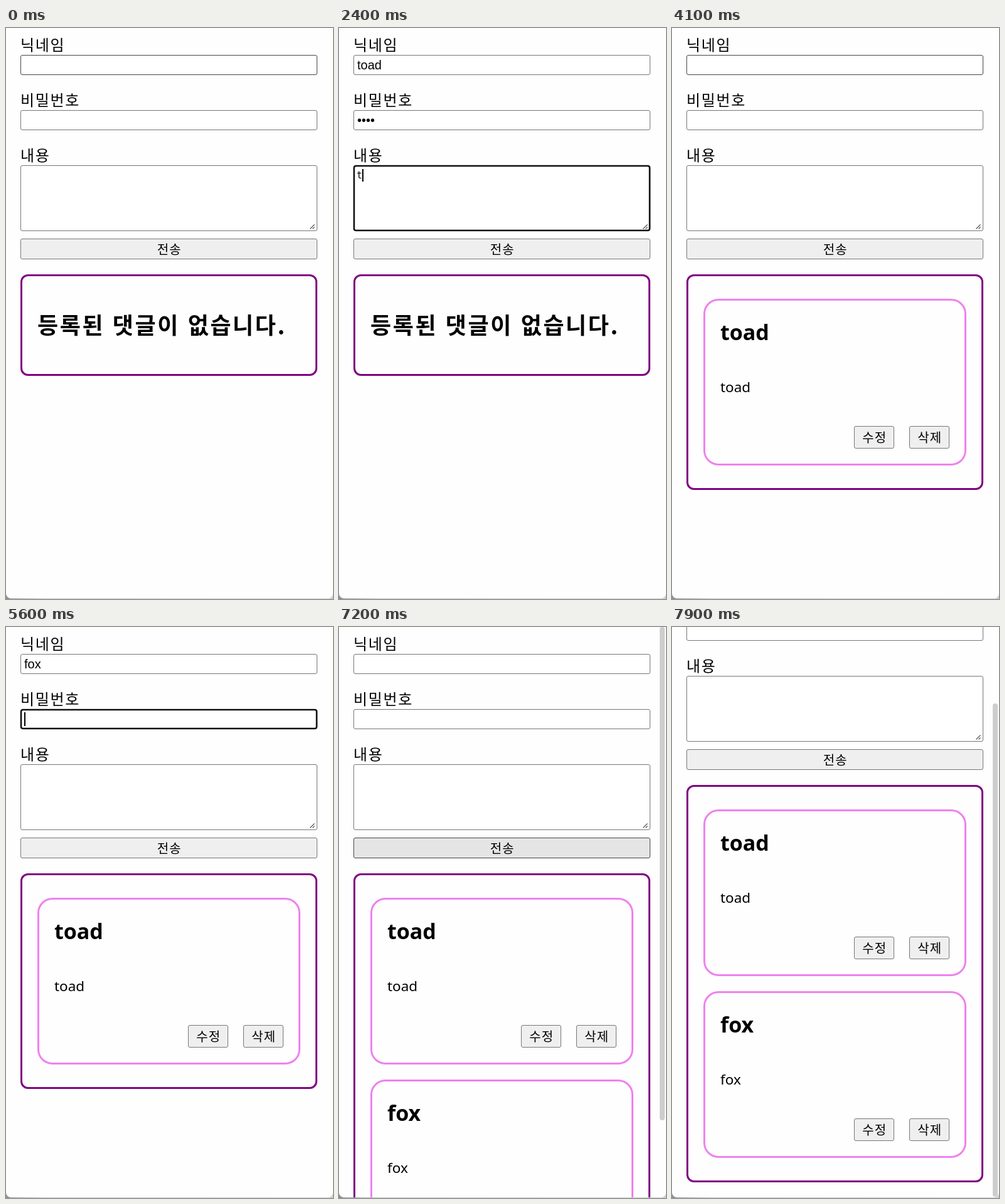
These frames come from a looping animation (521 px wide and 911 px high, 8000 ms). An HTML page:

```html
<!DOCTYPE html>
<html lang="ko">
<head>
<meta charset="utf-8">
<title>댓글</title>
<style>
  html, body { margin: 0; width: 100%; height: 100%; overflow: hidden; }
  svg { display: block; width: 521px; height: 911px; background: linear-gradient(90deg, #8d9196, #c3c7ca 12%, #cfd1d3); }
  text { font-family: "Noto Sans CJK KR", "Noto Sans CJK", sans-serif; white-space: pre; }
  .label { font-size: 24px; letter-spacing: 1.7px; }
  .empty { font-size: 36px; font-weight: 700; letter-spacing: 2.6px; }
  .btn text { font-size: 20px; letter-spacing: 1.2px; text-anchor: middle; }
  .btn rect { fill: #efefef; }
  .box { fill: #fff; stroke: #767676; }
  .hover .box { stroke: #454545; }
  .btn.hover rect { fill: #e5e5e5; }
  .ring { fill: none; stroke: #101010; stroke-width: 2.6; visibility: hidden; }
  .focus .ring { visibility: visible; }
  .caret { visibility: hidden; }
  .focus .caret { visibility: visible; }
  .value { font: 20px "Liberation Sans", Arial, sans-serif; }
  .mono { font: 15px "DejaVu Sans Mono", monospace; }
  .list { fill: none; stroke: #800080; stroke-width: 3; }
  .card { fill: none; stroke: #ee82ee; stroke-width: 3; }
  .name { font: 700 34px "Noto Sans", "Open Sans", sans-serif; }
  .body { font: 22.5px "Noto Sans", "Open Sans", sans-serif; }
  .grip { fill: none; stroke: #555; stroke-width: 1.2; }
</style>
</head>
<body>
<svg viewBox="0 0 521 911">
  <clipPath id="window"><path d="M0 0H521V902a8 8 0 0 1-8 8H8a8 8 0 0 1-8-8z"/></clipPath>
  <g clip-path="url(#window)">
    <rect width="521" height="911" fill="#fefefe"/>
    <g id="page"></g>
    <rect id="thumb" x="511" width="8" height="787" rx="4" fill="#cdcdcd"/>
  </g>
</svg>
<script>
const LOOP = 8000, TICK = 100, SCROLL = 141, THUMB_TRAVEL = 122;
const FIRST = 'toad', SECOND = 'fox';
const $ = id => document.getElementById(id);

const button = (id, x, y, w, h, label) => `
  <g class="btn" id="${id}">
    <rect class="box" x="${x + .5}" y="${y + .5}" width="${w - 1}" height="${h - 1}" rx="2.5"/>
    <text x="${x + w / 2 + .8}" y="${y + h / 2 + 8}">${label}</text>
  </g>`;

const field = (id, y, h, label, textX, baseline, caretY, caretH, font) => `
  <text class="label" x="23" y="${y - 7}">${label}</text>
  <g id="${id}">
    <rect class="box" x="23.5" y="${y + .5}" width="472" height="${h - 1}" rx="2.5"/>
    <rect class="ring" x="24" y="${y + 1}" width="471" height="${h - 2}" rx="3"/>
    <text class="${font}" x="${textX}" y="${baseline}"></text>
    <rect class="caret" x="${textX}" y="${caretY}" width="2" height="${caretH}"/>
  </g>`;

const post = (name, i) => `
  <g id="post${i}" transform="translate(0 ${i * 290})">
    <rect class="card" x="51.5" y="433.5" width="416" height="263" rx="22.5"/>
    <text class="name" x="77" y="498">${name}</text>
    <text class="body" x="77" y="581">${name}</text>
    ${button('edit' + i, 290, 635, 64, 36, '수정')}
    ${button('delete' + i, 378, 635, 64, 36, '삭제')}
  </g>`;

$('page').innerHTML =
  field('nick', 43, 32, '닉네임', 29, 66, 48, 22, 'value') +
  field('pass', 131, 32, '비밀번호', 29, 154, 136, 22, 'value') +
  field('memo', 219, 105, '내용', 28, 240, 225, 20, 'mono') +
  '<path class="grip" d="M484.5 320.5l7-7M488.5 320.5l3-3"/>' +
  button('send', 23, 336, 473, 33, '전송') +
  '<rect class="list" id="list" x="24.5" y="394.5" width="470" rx="10.5"/>' +
  '<text class="empty" id="empty" x="50" y="488">등록된 댓글이 없습니다.</text>' +
  post(FIRST, 0) + post(SECOND, 1);

const START = { nick: '', pass: '', memo: '', hover: 'nick', focus: '', posts: 0 };
const type = (id, word, ...times) =>
  times.map((t, i) => [t, { [id]: word.slice(0, i + 1) }]);
const sent = posts => ({ ...START, hover: 'send', posts });

const events = [
  [300, { focus: 'nick' }],
  ...type('nick', FIRST, 400, 600, 800, 900),
  [1100, { hover: 'pass' }],
  [1400, { focus: 'pass' }],
  ...type('pass', '••••', 1500, 1700, 1800, 1900),
  [2100, { hover: 'memo' }],
  [2300, { focus: 'memo' }],
  ...type('memo', FIRST, 2400, 2700, 2900, 2900),
  [3000, { hover: 'send' }],
  [3300, sent(1)],
  [3400, { hover: '' }],
  [3600, { hover: 'memo' }],
  [3900, { hover: 'pass' }],
  [4100, { hover: 'nick' }],
  [4300, { focus: 'nick' }],
  ...type('nick', SECOND, 4800, 4900, 5100),
  [5200, { hover: 'pass' }],
  [5600, { focus: 'pass' }],
  ...type('pass', '•••', 5700, 6100, 6200),
  [6200, { hover: 'memo' }],
  [6400, { focus: 'memo' }],
  ...type('memo', SECOND, 6500, 6600, 6700),
  [6900, { hover: 'send' }],
  [7200, sent(2)],
  [7500, { hover: '' }]
];

const show = (id, on) => $(id).style.display = on ? '' : 'none';

function draw(t) {
  const s = { ...START };
  for (const [at, change] of events) if (t >= at) Object.assign(s, change);

  for (const id of ['nick', 'pass', 'memo', 'send']) {
    $(id).classList.toggle('hover', s.hover === id);
    $(id).classList.toggle('focus', s.focus === id);
  }
  for (const id of ['nick', 'pass', 'memo']) {
    const text = $(id).querySelector('text');
    text.textContent = s[id];
    const width = s[id] ? text.getComputedTextLength() : 0;
    $(id).querySelector('.caret').setAttribute('x', Math.round(+text.getAttribute('x') + width));
  }

  show('empty', s.posts === 0);
  show('post0', s.posts > 0);
  show('post1', s.posts > 1);
  show('thumb', s.posts > 1);
  $('list').setAttribute('height', s.posts ? 51 + 290 * s.posts : 159);

  // Scrolling moves in the same steps as the recording clock.
  const p = Math.min(1, Math.max(0, (Math.floor(t / TICK) * TICK - 7400) / 500));
  const ease = p * p * (3 - 2 * p);
  $('page').setAttribute('transform', `translate(0 ${-Math.round(SCROLL * ease)})`);
  $('thumb').setAttribute('y', Math.round(THUMB_TRAVEL * ease));
}

const begin = performance.now();
function frame() {
  draw((performance.now() - begin) % LOOP);
  requestAnimationFrame(frame);
}
frame();
</script>
</body>
</html>
```
